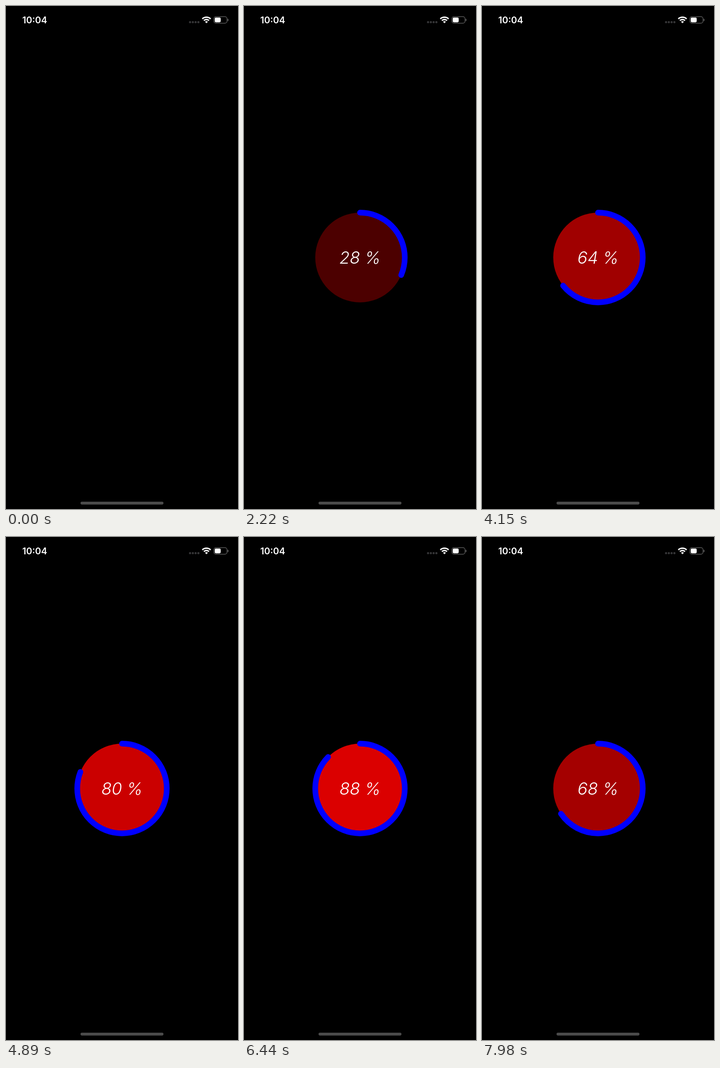
Animation, 509 px wide and 1101 px high, one loop 8000 ms. Source, as an HTML page with a canvas:

```html
<!DOCTYPE html>
<html lang="en">
<head>
<meta charset="utf-8">
<title>Circular progress</title>
<style>
  html, body { margin: 0; width: 100%; height: 100%; overflow: hidden; background: #000; }
  canvas { display: block; }
</style>
</head>
<body>
<canvas id="stage" width="509" height="1101"></canvas>
<script>
const ctx = document.getElementById('stage').getContext('2d');
const LOOP = 8000;
const APPEAR = 20;
const CX = 254.5, CY = 550.5, RADIUS = 98.2;
const ARC_LEAD = 1.4;

// [time in ms, percent]
const progressKeys = [[110, 0], [1280, 16.5], [3100, 42.6], [4150, 62.8], [5640, 96.6],
  [5780, 100], [6440, 86], [7660, 69.5], [8000, 63.8]];
const labelKeys = [[110, 0], [1280, 15], [3100, 40], [4150, 64], [5640, 96],
  [5820, 100], [6440, 88], [7980, 68]];

function valueAt(keys, t) {
  if (t <= keys[0][0]) return keys[0][1];
  for (let i = 1; i < keys.length; i++) {
    const [t0, v0] = keys[i - 1], [t1, v1] = keys[i];
    if (t <= t1) return v0 + (v1 - v0) * (t - t0) / (t1 - t0);
  }
  return keys[keys.length - 1][1];
}

function roundBox(x, y, w, h, r) {
  ctx.beginPath();
  ctx.roundRect(x, y, w, h, r);
}

function disc(x, y, r, color) {
  ctx.fillStyle = color;
  ctx.beginPath();
  ctx.arc(x, y, r, 0, Math.PI * 2);
  ctx.fill();
}

function text(str, x, y, font) {
  ctx.font = font;
  ctx.fillStyle = '#fff';
  ctx.textAlign = 'center';
  ctx.fillText(str, x, y);
}

function drawWifi(x, y) {
  const up = -Math.PI / 2, half = 0.76;
  ctx.strokeStyle = ctx.fillStyle = '#fff';
  ctx.lineWidth = 3;
  ctx.lineCap = 'butt';
  for (const r of [13.2, 8.2]) {
    ctx.beginPath();
    ctx.arc(x, y, r, up - half, up + half);
    ctx.stroke();
  }
  ctx.beginPath();
  ctx.moveTo(x, y);
  ctx.arc(x, y, 4.6, up - half, up + half);
  ctx.fill();
}

function drawBattery() {
  ctx.strokeStyle = '#6a6a6a';
  ctx.lineWidth = 1.3;
  roundBox(456.1, 23.4, 28.8, 14.2, 4.4);
  ctx.stroke();
  ctx.fillStyle = '#fff';
  roundBox(458, 25.3, 13, 10.4, 2.4);
  ctx.fill();
  ctx.fillStyle = '#6a6a6a';
  roundBox(486.3, 28, 1.8, 5, [0, 1.8, 1.8, 0]);
  ctx.fill();
}

function drawChrome() {
  ctx.fillStyle = '#000';
  ctx.fillRect(0, 0, 509, 1101);
  text('10:04', 63, 38, '600 20px Inter, sans-serif');
  for (let i = 0; i < 4; i++) disc(403.8 + i * 6.1, 35.4, 2.4, '#363638');
  drawWifi(439.8, 37.8);
  drawBattery();
  ctx.fillStyle = '#4b4b4b';
  roundBox(163.5, 1085, 182, 6.2, 3.1);
  ctx.fill();
}

function drawProgress(t) {
  const progress = valueAt(progressKeys, t);
  const sweep = Math.min(100, progress + ARC_LEAD) / 100 * Math.PI * 2;
  disc(CX, CY, RADIUS, `rgb(${Math.round(progress * 2.55)}, 0, 0)`);
  ctx.strokeStyle = '#00f';
  ctx.lineWidth = 12.4;
  ctx.lineCap = 'round';
  ctx.beginPath();
  ctx.arc(CX, CY, RADIUS, -Math.PI / 2, sweep - Math.PI / 2);
  ctx.stroke();
  text(`${Math.round(valueAt(labelKeys, t))} %`, CX, 564, 'italic 300 37px Inter, sans-serif');
}

function frame() {
  const t = performance.now() % LOOP;
  drawChrome();
  if (t >= APPEAR) drawProgress(t);
  requestAnimationFrame(frame);
}
frame();
</script>
</body>
</html>
```
